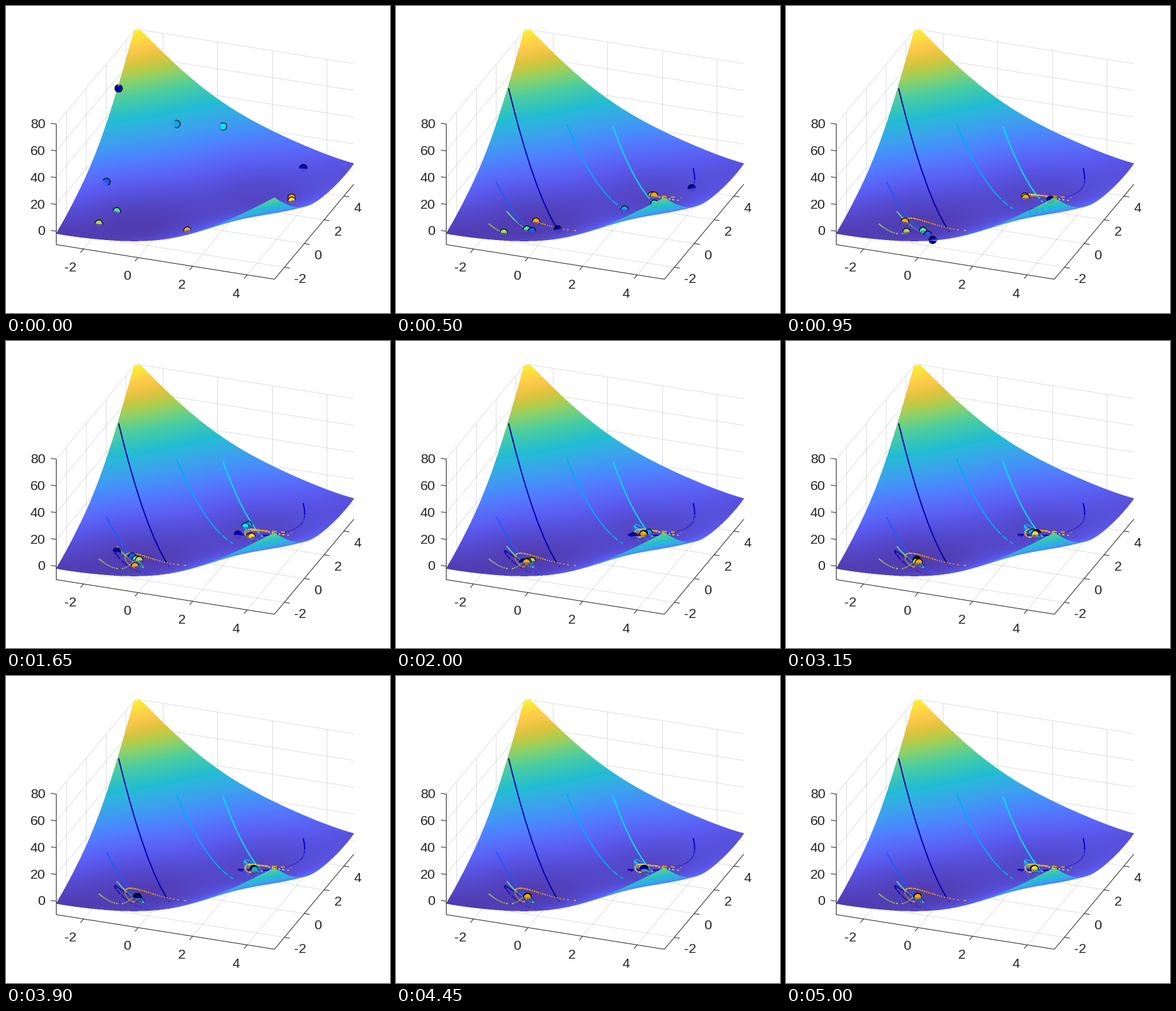
A matplotlib script that plays this animation: 600x480 px, repeating every 5050 ms.

```python
import numpy as np
import matplotlib.pyplot as plt
from matplotlib.animation import FuncAnimation
from matplotlib.collections import LineCollection
from matplotlib.colors import LinearSegmentedColormap

W, H, DPI = 600, 480, 100
FRAMES, INTERVAL = 101, 50
PX = 72 / DPI                      # one pixel in points
LO, HI, ZLO, ZHI = -3, 5, -10, 80
RATE, MOMENTUM = 0.01, 0.9
SUB = 12                           # trail samples per step
BIAS = 0.003                       # depth tolerance
SEE_THROUGH = 0.1
INK = (0.15, 0.15, 0.15)

STARTS = np.array([(-2.97, 3.20), (3.53, 3.94), (-2.325, 0.205),
                   (-0.916, 3.394), (0.46, 4.29), (-1.55, -0.89),
                   (-1.84, -1.90), (3.94, 1.66), (3.83, 1.95),
                   (1.38, -1.82)])
COLORS = ['#0000aa', '#0000c8', '#1e5afa', '#00aafa', '#00e6f0',
          '#54d6a0', '#afd750', '#ffd732', '#ffa500', '#ffa500']

PARULA = [(0, (.2422, .1504, .6603)), (1/9, (.2803, .2782, .9221)),
          (1/7, (.2810, .3228, .9578)), (2/9, (.2440, .4358, .9988)),
          (2/7, (.1786, .5289, .9682)), (1/3, (.1540, .5902, .9218)),
          (3/7, (.0689, .6948, .8394)), (4/9, (.0297, .7082, .8163)),
          (4/7, (.2161, .7843, .5923)), (2/3, (.5044, .7993, .3480)),
          (5/7, (.6720, .7793, .2227)), (7/9, (.8634, .7406, .1596)),
          (6/7, (.9970, .7659, .2199)), (8/9, (.9892, .8136, .1885)),
          (1, (.9769, .9839, .0805))]
parula = LinearSegmentedColormap.from_list('parula_like', PARULA)

# Orthographic view stretched to fill the plot box
SA, CA = np.sin(np.radians(20)), np.cos(np.radians(20))
SE, CE = np.sin(np.radians(40)), np.cos(np.radians(40))
KX = 465 / (CA + SA)
KY = 391.2 / ((CA + SA) * SE + CE)


def height(x, y):
    return np.sin(x + y) + (x - y) ** 2 - 1.5 * x + 2.5 * y + 1


def slope(p):
    x, y = p[..., 0], p[..., 1]
    c, d = np.cos(x + y), 2 * (x - y)
    return np.stack([c + d - 1.5, c - d + 2.5], axis=-1)


def project(x, y, z):
    """Screen x, screen y and nearness to the viewer."""
    a = (x - LO) / (HI - LO)
    b = (y - LO) / (HI - LO)
    c = (z - ZLO) / (ZHI - ZLO)
    sx = 78.5 + KX * (CA * a + SA * b)
    sy = 427.2 - KY * (SE * (SA * (1 - a) + CA * b) + CE * c)
    return sx, sy, CE * (SA * a - CA * b) + SE * c


def screen(x, y, z):
    return np.array(project(x, y, z)[:2])


def render_surface(n=2000, s=2):
    """Depth-buffered surface: RGBA image and depth map."""
    g = np.linspace(LO, HI, n)
    x, y = (m.ravel() for m in np.meshgrid(g, g))
    z = height(x, y)
    zmin, zmax = z.min(), z.max()
    keep = z <= ZHI
    x, y, z = x[keep], y[keep], z[keep]
    sx, sy, d = project(x, y, z)
    cell = (sy * s).astype(int) * (W * s) + (sx * s).astype(int)
    order = np.argsort(d)
    zbuf = np.full(W * H * s * s, np.nan)
    dbuf = np.full(W * H * s * s, -np.inf)
    zbuf[cell[order]] = z[order]
    dbuf[cell[order]] = d[order]
    hit = np.isfinite(zbuf)
    tone = (np.where(hit, zbuf, 0) - zmin) / (zmax - zmin)
    rgb = parula(tone)[:, :3] * (1 - SEE_THROUGH) + SEE_THROUGH
    layer = np.concatenate([rgb * hit[:, None], hit[:, None]], axis=1)
    img = layer.reshape(H, s, W, s, 4).mean(axis=(1, 3))
    img[..., :3] /= np.maximum(img[..., 3:], 1e-6)
    depth = dbuf.reshape(H, s, W, s).max(axis=(1, 3))
    return np.clip(img, 0, 1), depth


def descend():
    """Gradient descent with momentum, one step per frame."""
    pos, vel = STARTS.copy(), np.zeros_like(STARTS)
    steps = [pos]
    for _ in range(FRAMES - 1):
        vel = MOMENTUM * vel - RATE * slope(pos)
        pos = pos + vel
        steps.append(pos)
    return np.array(steps)


def inside(x, y):
    return (np.minimum(x, y) >= LO) & (np.maximum(x, y) <= HI)


surface, depth = render_surface()
path = descend()
path_z = height(path[..., 0], path[..., 1])


def make_trail(i):
    t = np.arange((FRAMES - 1) * SUB + 1) / SUB
    k = np.arange(FRAMES)
    x, y, z = (np.interp(t, k, v)
               for v in (path[:, i, 0], path[:, i, 1], path_z[:, i]))
    sx, sy, d = project(x, y, z)
    col = np.clip(sx.astype(int), 0, W - 1)
    row = np.clip(sy.astype(int), 0, H - 1)
    seen = inside(x, y) & (d + BIAS >= depth[row, col])
    return np.where(seen, sx, np.nan), np.where(seen, sy, np.nan)


def stamp(layer, sx, sy, d, color, r=6.4, edge=1.2):
    """Blend one disc into the layer, sunk where the surface is nearer."""
    x0, y0 = int(sx) - 9, int(sy) - 9
    box = np.s_[y0:y0 + 19, x0:x0 + 19]
    yy, xx = np.mgrid[y0:y0 + 19, x0:x0 + 19] + 0.5
    dist = np.hypot(xx - sx, yy - sy)
    cover = np.clip(r - dist + 0.5, 0, 1)
    fill = np.clip(r - edge - dist + 0.5, 0, 1)
    seen = np.clip((d - depth[box] + BIAS) / 0.002 + 0.5, 0, 1)
    a = (cover * (SEE_THROUGH + (1 - SEE_THROUGH) * seen))[..., None]
    rgb = np.array(color) * fill[..., None]
    old = layer[box]
    under = old[..., 3:] * (1 - a)
    total = a + under
    mix = (rgb * a + old[..., :3] * under) / np.maximum(total, 1e-6)
    layer[box] = np.concatenate([mix, total], axis=-1)


fig = plt.figure(figsize=(W / DPI, H / DPI), dpi=DPI, facecolor='white')
ax = fig.add_axes([0, 0, 1, 1])
ax.set_xlim(0, W)
ax.set_ylim(H, 0)
ax.axis('off')


def draw_box():
    grid, frame = [], []
    for t in (-2, 0, 2, 4):
        grid += [[screen(t, HI, ZLO), screen(t, HI, ZHI)],
                 [screen(LO, t, ZLO), screen(LO, t, ZHI)],
                 [screen(t, LO, ZLO), screen(t, HI, ZLO)],
                 [screen(LO, t, ZLO), screen(HI, t, ZLO)]]
        px, py = screen(t, LO, ZLO), screen(HI, t, ZLO)
        frame += [[px, px + (-4.8, 5.8)], [py, py + (8.4, 1.3)]]
        label(t, px + (-11, 27.5), 'right')
        label(t, py + (15.5, 17), 'left')
    for t in range(0, 81, 20):
        grid += [[screen(LO, LO, t), screen(LO, HI, t)],
                 [screen(LO, HI, t), screen(HI, HI, t)]]
        pz = screen(LO, LO, t)
        frame.append([pz, pz + (-8.4, -1.3)])
        label(t, pz + (-17, -1.3), 'right')
    frame.append([screen(LO, LO, ZHI), screen(LO, LO, ZLO),
                  screen(HI, LO, ZLO), screen(HI, HI, ZLO)])
    ax.add_collection(LineCollection(grid, colors=[INK + (0.15,)],
                                     linewidths=PX, zorder=1))
    ax.add_collection(LineCollection(frame, colors=[INK],
                                     linewidths=PX, zorder=3))


def label(value, at, side):
    ax.text(at[0], at[1] + 7.6, str(value), ha=side, va='baseline',
            color=INK, fontsize=21.33 * PX, family='Liberation Sans')


draw_box()
full = dict(extent=(0, W, H, 0), interpolation='nearest', aspect='auto')
ax.imshow(surface, zorder=2, **full)
markers = ax.imshow(np.zeros((H, W, 4)), zorder=5, **full)
trails = [make_trail(i) for i in range(len(STARTS))]
lines = [ax.plot([], [], color=c, lw=1.9 * PX, zorder=4,
                 solid_capstyle='butt')[0] for c in COLORS]
tones = [plt.matplotlib.colors.to_rgb(c) for c in COLORS]


def update(k):
    for line, (tx, ty) in zip(lines, trails):
        n = k * SUB + 1
        line.set_data(tx[:n], ty[:n])
    x, y = path[k].T
    sx, sy, d = project(x, y, path_z[k])
    layer = np.zeros((H, W, 4))
    for i in np.argsort(d):
        if inside(x[i], y[i]):
            stamp(layer, sx[i], sy[i], d[i], tones[i])
    markers.set_data(np.clip(layer, 0, 1))
    return [markers, *lines]


anim = FuncAnimation(fig, update, frames=FRAMES, interval=INTERVAL,
                     init_func=lambda: update(0), repeat=True,
                     repeat_delay=0, blit=False)
plt.show()
```
